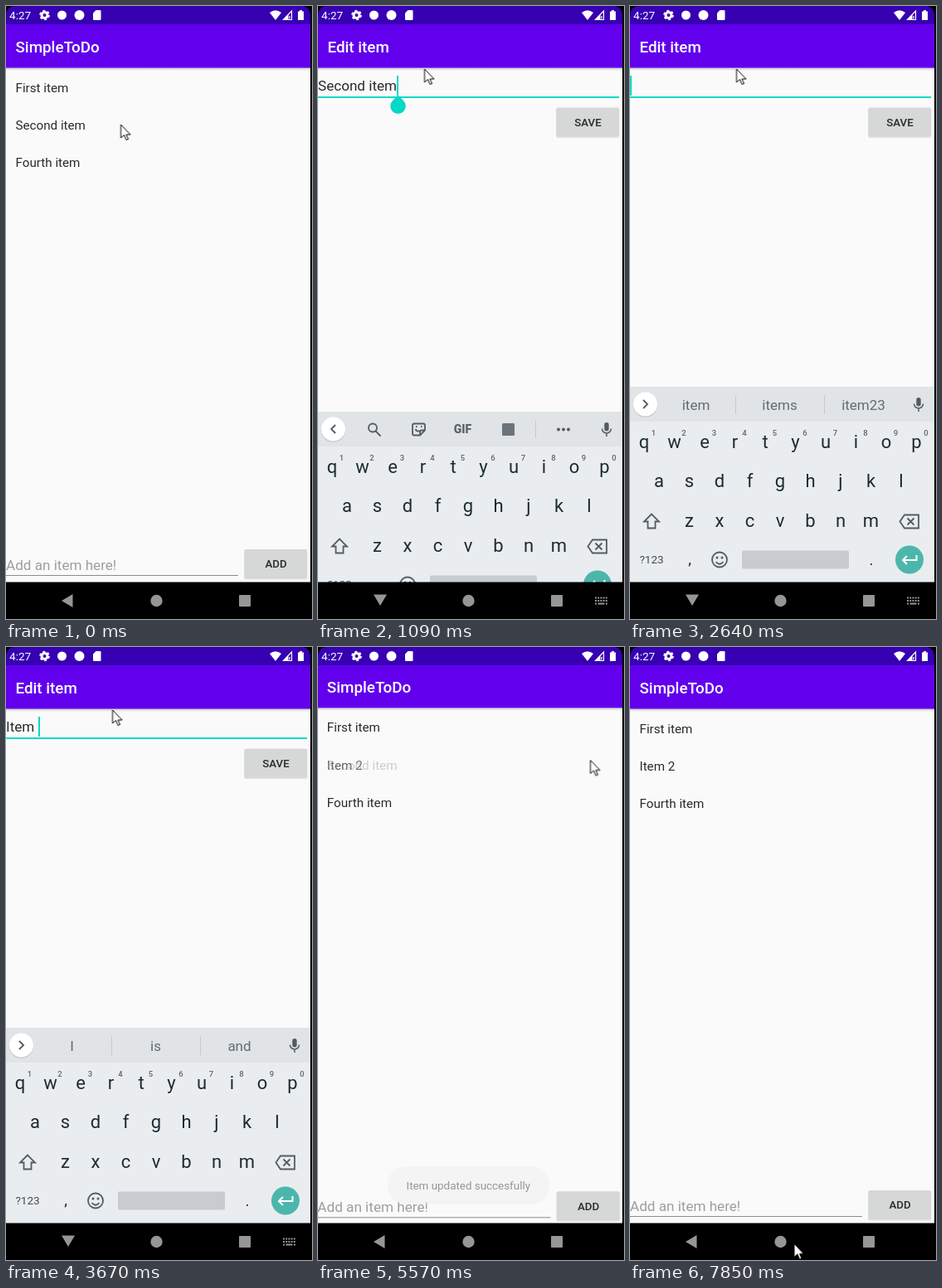
Write an HTML page that moves like this. It is 369x739 px and loops after 8000 ms.

```html
<!DOCTYPE html>
<html lang="en">
<head>
<meta charset="utf-8">
<title>To-do list demo</title>
<style>
html, body { margin: 0; width: 100%; height: 100%; overflow: hidden; background: #000; }
svg { display: block; width: 369px; height: 739px; font-family: Roboto, sans-serif; }
text { white-space: pre; fill: #2a2a2a; }
.title { font-size: 18.8px; font-weight: 500; fill: #fff; }
.row { font-size: 15.2px; }
.field { font-size: 17.1px; }
.button { font-size: 13.3px; font-weight: 500; text-anchor: middle; }
.key { font-size: 22px; fill: #1d2b33; text-anchor: middle; }
.digit { font-size: 9.5px; font-weight: 500; fill: #5c666c; text-anchor: middle; }
.word { font-size: 17px; fill: #636c72; text-anchor: middle; }
.line { fill: none; stroke: #525c62; stroke-width: 1.8; }
.under { text-decoration: underline; text-decoration-thickness: 1px; }

.a { animation: 8s step-end infinite; }
.screen { transform-origin: 184px 370px; }
#cursor { animation-name: cursor; }
#list { animation-name: list; }
#edit { animation-name: edit; }
#touch { animation-name: touch; }
#before { animation-name: before; }
#after { animation-name: after; }
#focus { animation-name: focus; }
#caret { animation-name: caret; }
#handle { animation-name: handle; }
#saveTint { animation-name: saveTint; }
#keyboard, .kbNav { animation-name: keyboard; }
.kbNav { animation-name: kbNav; }
#back { animation-name: back; }
#tools { animation-name: tools; }
#wordsA { animation-name: wordsA; }
#wordsB { animation-name: wordsB; }
#toast { animation-name: toast; }

@keyframes cursor {
  0% { transform: translate(138.5px, 143px); }
  5% { transform: translate(136px, 125px); }
  6.875% { transform: translate(133.5px, 102px); }
  10.25% { transform: translate(128.5px, 76px); }
  56.25% { transform: translate(140px, 95px); }
  58% { transform: translate(180px, 150px); }
  59.75% { transform: translate(235px, 205px); }
  61.5% { transform: translate(281px, 215px); }
  63.25% { transform: translate(310px, 180px); }
  64.875% { transform: translate(328.5px, 136.5px); }
  73% { transform: translate(326px, 200px); }
  74.75% { transform: translate(318px, 330px); }
  76.5% { transform: translate(305px, 470px); }
  78.375% { transform: translate(294px, 590px); }
  80.125% { transform: translate(289.5px, 642px); }
  85.25% { transform: translate(296px, 657px); }
  87.125% { transform: translate(316px, 690px); }
  88.875% { transform: translate(321px, 712px); }
  90.75% { transform: translate(290px, 720px); }
  92.5% { transform: translate(245px, 720px); }
  94.375% { transform: translate(210px, 720px); }
  96.25%, 100% { transform: translate(198px, 719.5px); }
}
@keyframes list {
  0% { transform: none; }
  5% { transform: scale(1.07); }
  6.875% { transform: none; }
  68% { transform: scale(1.04); }
  69.625% { transform: scale(1.004); }
  71.25%, 100% { transform: none; }
}
@keyframes edit {
  0% { opacity: 0; transform: none; }
  5% { opacity: .6; transform: scale(.95); }
  6.875% { opacity: 1; transform: none; }
  68% { opacity: .35; transform: scale(.96); }
  69.625%, 100% { opacity: 0; transform: none; }
}
@keyframes touch { 0% { opacity: 0; } 3.125% { opacity: .1; } 6.875%, 100% { opacity: 0; } }
@keyframes before { 0% { opacity: 1; } 69.625% { opacity: .22; } 71.25%, 100% { opacity: 0; } }
@keyframes after { 0% { opacity: 0; } 69.625% { opacity: .65; } 71.25%, 100% { opacity: 1; } }
@keyframes focus { 0% { opacity: 0; } 8.75%, 100% { opacity: 1; } }
@keyframes caret { 0% { opacity: 1; } 54.625% { opacity: 0; } 61.5%, 100% { opacity: 1; } }
@keyframes handle { 0% { opacity: 0; } 10.25% { opacity: 1; } 24.25%, 100% { opacity: 0; } }
@keyframes saveTint { 0% { opacity: 0; } 66.5% { opacity: .13; } 69.625%, 100% { opacity: 0; } }
@keyframes keyboard {
  0% { transform: translateY(240px); }
  10.25% { transform: translateY(120px); }
  12.125% { transform: translateY(30px); }
  13.75% { transform: none; }
  68% { transform: translateY(120px); }
  69.625%, 100% { transform: translateY(240px); }
}
@keyframes kbNav { 0% { opacity: 0; } 10.25% { opacity: 1; } 68%, 100% { opacity: 0; } }
@keyframes back { 0% { opacity: 1; } 10.25% { opacity: 0; } 68%, 100% { opacity: 1; } }
@keyframes tools { 0% { opacity: 1; } 17.375% { opacity: 0; } 49.625%, 100% { opacity: 1; } }
@keyframes wordsA { 0% { opacity: 0; } 17.375% { opacity: 1; } 38.75%, 100% { opacity: 0; } }
@keyframes wordsB { 0% { opacity: 0; } 38.75% { opacity: 1; } 49.625%, 100% { opacity: 0; } }
@keyframes toast {
  0% { opacity: 0; }
  69.625% { opacity: .55; }
  71.25% { opacity: 1; }
  90.75% { opacity: .6; }
  92.5% { opacity: .25; }
  94.375%, 100% { opacity: 0; }
}
</style>
</head>
<body>
<svg viewBox="0 0 369 739">
  <defs>
    <linearGradient id="shade" x2="0" y2="1">
      <stop stop-color="#000" stop-opacity=".22"/>
      <stop offset="1" stop-color="#000" stop-opacity="0"/>
    </linearGradient>
    <g id="frame">
      <rect y="22" width="367" height="674" fill="#fafafa"/>
      <rect y="74" width="367" height="4" fill="url(#shade)"/>
      <rect y="10" width="367" height="64.5" fill="#6200ee"/>
    </g>
    <g id="plate">
      <rect x="-.5" y=".5" width="76.5" height="36" rx="2.5" fill="#000" opacity=".1"/>
      <rect width="75.5" height="35" rx="2" fill="#d6d7d7"/>
    </g>
  </defs>

  <g id="list" class="a screen">
    <use href="#frame"/>
    <text class="title" x="11.5" y="56">SimpleToDo</text>
    <rect id="touch" class="a" y="121" width="367" height="45"/>
    <text class="row" x="11.5" y="103.5">First item</text>
    <text id="before" class="row a" x="11.5" y="148.7">Second item</text>
    <text id="after" class="row a" x="11.5" y="148.7">Item 2</text>
    <text class="row" x="11.5" y="194">Fourth item</text>
    <text class="field" x="0" y="679.5" style="fill:#9e9e9e">Add an item here!</text>
    <rect y="686" width="280" height="1" fill="#8c8c8c"/>
    <use href="#plate" x="287.5" y="655"/>
    <text class="button" x="325.5" y="677.3">ADD</text>
  </g>

  <g id="edit" class="a screen">
    <use href="#frame"/>
    <text class="title" x="11.5" y="56">Edit item</text>
    <text id="typed" class="field" x="0" y="102.3"><tspan></tspan><tspan class="under"></tspan></text>
    <rect y="109" width="363" height="1" fill="#8c8c8c"/>
    <g id="focus" class="a" fill="#03dac5">
      <rect y="109" width="363" height="2"/>
      <rect id="caret" class="a" y="84" width="2" height="24"/>
      <path id="handle" class="a" d="M96.5 107.5L103 114a9.3 9.3 0 1 1-13 0z"/>
    </g>
    <use href="#plate" x="287.5" y="122.5"/>
    <rect id="saveTint" class="a" x="287.5" y="122.5" width="75.5" height="35" rx="2"/>
    <text class="button" x="325.5" y="145">SAVE</text>
  </g>

  <g id="keyboard" class="a">
    <rect y="459" width="367" height="237" fill="#e9edf0"/>
    <rect y="459" width="367" height="42" fill="#e0e4e7"/>
    <circle cx="18.5" cy="481" r="14.8" fill="#000" opacity=".12"/>
    <circle cx="18.5" cy="480" r="14.5" fill="#fff"/>
    <g id="tools" class="a">
      <path class="line" d="M21 475l-5 5 5 5"/>
      <circle class="line" cx="66" cy="478.5" r="5"/>
      <path class="line" d="M69.5 482.5l6 6"/>
      <path class="line" d="M116 473.5h11a2 2 0 0 1 2 2v6l-6 6h-7a2 2 0 0 1-2-2v-10a2 2 0 0 1 2-2zM129 481.5h-4a2 2 0 0 0-2 2v4M117.5 480q2 4 5 2M118 477h1.5M124 477h1.5"/>
      <text x="174.5" y="485" text-anchor="middle" style="font-size:14px;font-weight:900;fill:#59636a">GIF</text>
      <rect x="222" y="473" width="15" height="15" rx="1.5" fill="#6a747a"/>
      <rect x="262" y="470" width="1" height="21" fill="#c5cacd"/>
      <g fill="#525c62"><circle cx="290" cy="480.5" r="2"/><circle cx="296" cy="480.5" r="2"/><circle cx="302" cy="480.5" r="2"/></g>
    </g>
    <g id="wordsA" class="a words" data-words="item items item23"></g>
    <g id="wordsB" class="a words" data-words="I is and"></g>
    <rect x="345.3" y="472" width="5.4" height="10.5" rx="2.7" fill="#525c62"/>
    <path class="line" style="stroke-width:1.5" d="M342.5 479.5a5.5 5.5 0 0 0 11 0M348 485v4"/>
    <g id="keys"></g>
    <path class="line" d="M26 612.5l-9 9h4.5v8h9v-8H35z"/>
    <path class="line" d="M331 613.5h17v16h-17l-5.500-8zM334.500 617.500l8 8M342.500 617.500l-8 8"/>
    <text x="26" y="672.3" text-anchor="middle" style="font-size:13.5px;fill:#414c53">?123</text>
    <text class="key" x="72" y="673" style="font-size:19px">,</text>
    <circle class="line" cx="108" cy="667.500" r="9"/>
    <path class="line" d="M103.500 670q4.500 5.500 9 0"/>
    <circle cx="105" cy="665" r="1.500" fill="#525c62"/><circle cx="111" cy="665" r="1.500" fill="#525c62"/>
    <rect x="135" y="656.500" width="129" height="22" rx="2" fill="#c8ccd0"/>
    <text class="key" x="291" y="674" style="font-size:19px">.</text>
    <circle cx="337" cy="667.500" r="17" fill="#4db6ac"/>
    <path class="line" style="stroke:#fff;stroke-width:2" d="M345.500 662v6h-16M334 663l-5 5 5 5"/>
  </g>

  <g id="toast" class="a">
    <rect x="84" y="626" width="195" height="46" rx="22" fill="#eee"/>
    <text x="106.500" y="654" style="font-size:13.400px;fill:#444">Item updated succesfully</text>
  </g>

  <!-- system bars -->
  <rect width="367" height="22" fill="#3700b3"/>
  <text x="4" y="16" style="font-size:13.600px;fill:#fff">4:27</text>
  <g fill="#fff">
    <circle cx="46.500" cy="11" r="3.500" fill="none" stroke="#fff" stroke-width="3"/>
    <circle cx="46.500" cy="11" r="5.300" fill="none" stroke="#fff" stroke-width="2" stroke-dasharray="2.800 2.750"/>
    <circle cx="67.500" cy="11" r="5.500"/>
    <circle cx="88.500" cy="11" r="6"/>
    <path d="M108.500 5h5a1 1 0 0 1 1 1v10a1 1 0 0 1-1 1h-7.500a1 1 0 0 1-1-1V8.500z"/>
    <path d="M318 8q7-5.500 14 0l-7 9z"/>
    <path d="M344.500 6v10.500H334.500zM342 12v3.500" fill="none" stroke="#fff" stroke-width="1.200"/>
    <path d="M340.500 10v6.500H334z"/>
    <path d="M354 5h3v1.500h2V17h-7V6.500h2z"/>
  </g>
  <rect y="694.500" width="369" height="45"/>
  <rect x="367" width="2" height="739"/>
  <path d="M0 0h10Q1 1 0 10zM367 0h-10q9 1 10 10z"/>
  <g fill="#969696">
    <path id="back" class="a" d="M67 717l13.500-8v16z"/>
    <path class="a kbNav" d="M67 709.500h16l-8 13.500z"/>
    <circle cx="181.500" cy="717" r="7.200"/>
    <rect x="281" y="710" width="14" height="14" rx="1"/>
    <g class="a kbNav" stroke="#969696" stroke-width="2" fill="none">
      <path d="M334 713.500h15M334 717h15" stroke-dasharray="2 1.200"/>
      <path d="M334 720.500h2M337.500 720.500h8M347 720.500h2"/>
    </g>
  </g>

  <path id="cursor" class="a" d="M0 0V16L4 12.500L6.500 18.500L9 17.500L6.500 12H11.500Z" fill="#fff" stroke="#000"/>
</svg>
<script>
const NS = 'http://www.w3.org/2000/svg';
const LOOP = 8000;

function label(parent, cls, x, y, str) {
  const el = document.createElementNS(NS, 'text');
  el.setAttribute('class', cls);
  el.setAttribute('x', x);
  el.setAttribute('y', y);
  el.textContent = str;
  parent.append(el);
}

const keys = document.getElementById('keys');
const rows = [['qwertyuiop', 17, 532.5], ['asdfghjkl', 35, 580], ['zxcvbnm', 71.5, 627.5]];
rows.forEach(([letters, left, y], r) => [...letters].forEach((ch, i) => {
  const x = left + 36.5 * i;
  label(keys, 'key', x, y, ch);
  if (r === 0) label(keys, 'digit', x + 11.5, 517.5, (i + 1) % 10);
}));

for (const group of document.querySelectorAll('.words')) {
  group.innerHTML = '<path class="line" d="M13.500 0" />' +
    '<path class="line" d="M16 475l5 5-5 5"/>' +
    '<path d="M127.500 469v23M234.500 469v23" stroke="#c5cacd"/>';
  group.dataset.words.split(' ').forEach((w, i) => label(group, 'word', 79.5 + 101 * i, 487, w));
}

// time, settled text, text still being composed
const typing = [
  [0, 'Second item', ''], [1390, 'Second ', 'item'], [1790, 'Second ', 'ite'],
  [1940, 'Second ', 'it'], [2250, 'Second', ''], [2380, 'Seco', ''],
  [2510, 'Se', ''], [2640, '', ''], [3100, '', 'It'], [3380, '', 'Ite'],
  [3520, '', 'Item'], [3670, 'Item ', ''], [3820, 'Item 2', '']
];
const typed = document.getElementById('typed');
const caret = document.getElementById('caret');
const [settled, composing] = typed.children;
let start;

function draw(now) {
  start ??= now;
  const t = (now - start) % LOOP;
  const [, done, open] = typing.findLast(step => step[0] <= t);
  settled.textContent = done;
  composing.textContent = open;
  caret.setAttribute('x', Math.round(typed.getComputedTextLength()));
  requestAnimationFrame(draw);
}
requestAnimationFrame(draw);
</script>
</body>
</html>
```
